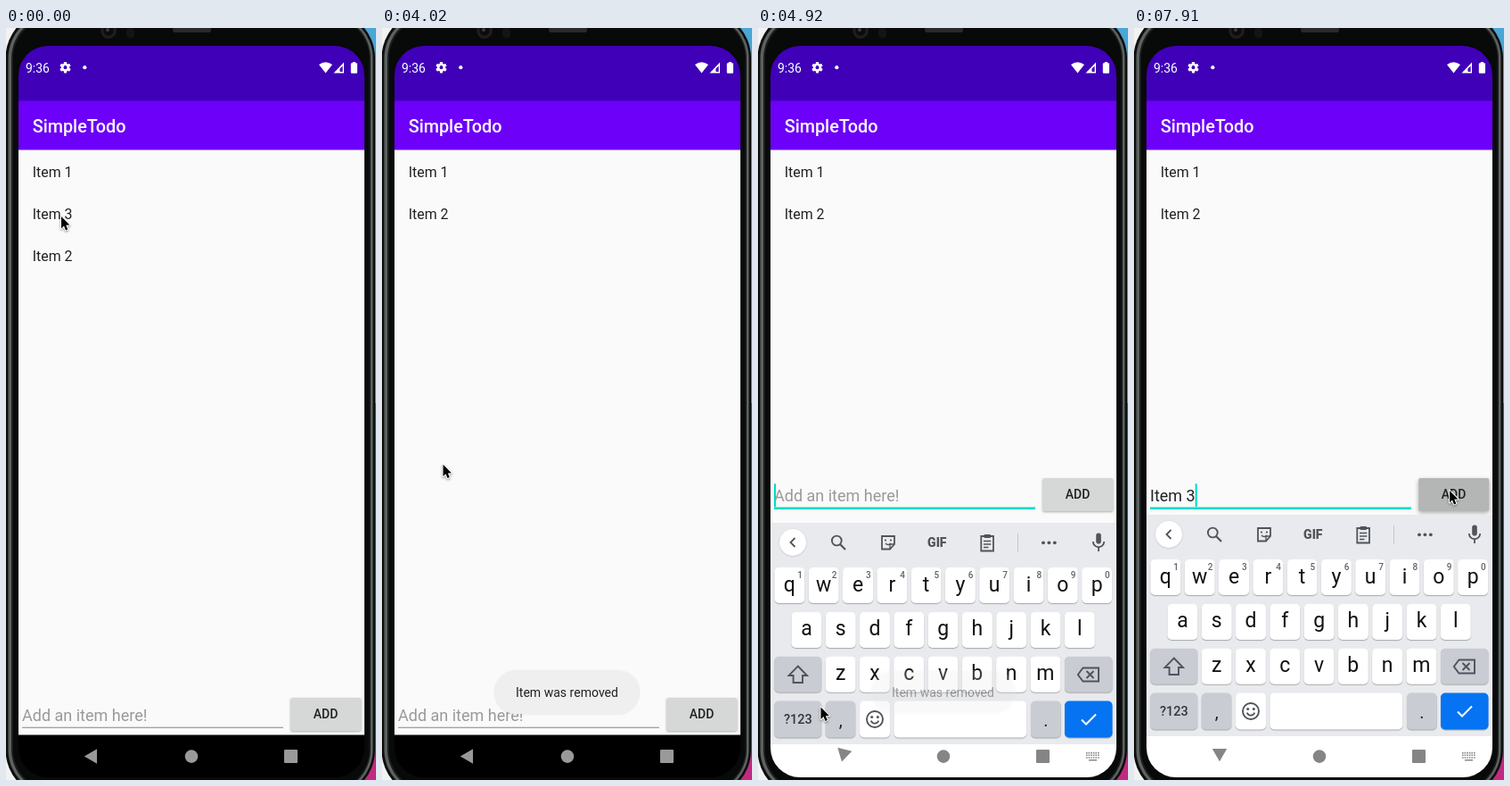
Write an HTML page with a canvas that moves like this. It is 415 px wide and 842 px high and loops after 8000 ms.

```html
<!DOCTYPE html>
<html lang="en">
<head>
<meta charset="utf-8">
<title>Todo list demo</title>
<style>
html, body { margin: 0; width: 100%; height: 100%; overflow: hidden; background: #fff; }
canvas { display: block; width: 415px; height: 842px; }
</style>
</head>
<body>
<canvas id="stage"></canvas>
<script>
const W = 415, H = 842, LOOP = 8000;
const TEAL = '#00dac6', INK = '#202124', ICON = '#50545a';
const canvas = document.getElementById('stage');
const c = canvas.getContext('2d');
const dpr = window.devicePixelRatio || 1;
canvas.width = W * dpr;
canvas.height = H * dpr;

// ---------- helpers ----------
function box(x, y, w, h, color, r = 0) {
  c.fillStyle = color;
  c.beginPath();
  c.roundRect(x, y, w, h, r);
  c.fill();
}
function disc(x, y, r, color) {
  c.fillStyle = color;
  c.beginPath();
  c.arc(x, y, r, 0, Math.PI * 2);
  c.fill();
}
function trace(points, close) {
  c.beginPath();
  points.forEach(([x, y]) => c.lineTo(x, y));
  if (close) c.closePath();
}
function poly(points, color) {
  trace(points, true);
  c.fillStyle = color;
  c.fill();
}
function stroke(color, width) {
  c.strokeStyle = color;
  c.lineWidth = width;
  c.stroke();
}
function line(points, color, width, close) {
  trace(points, close);
  stroke(color, width);
}
function ring(x, y, r, color, width, from = 0, to = Math.PI * 2) {
  c.beginPath();
  c.arc(x, y, r, from, to);
  stroke(color, width);
}
function text(str, x, y, size, color, weight = 400, align = 'left') {
  c.font = `${weight} ${size}px Roboto, sans-serif`;
  c.textAlign = align;
  c.fillStyle = color;
  c.fillText(str, x, y);
}
function shadowed(blur, dy, alpha, draw) {
  c.save();
  c.shadowColor = `rgba(0,0,0,${alpha})`;
  c.shadowBlur = blur * dpr;
  c.shadowOffsetY = dy * dpr;
  draw();
  c.restore();
}
const mix = (a, b, k) => a + (b - a) * k;
const ease = k => k * k * (3 - 2 * k);

// value of the last [time, value] entry already reached
function at(list, t) {
  let value = list[0][1];
  for (const [time, v] of list) if (t >= time) value = v;
  return value;
}

// the screen refreshes about every 150 ms
function tick(t) {
  const lag = t < 3580 ? 0 : t < 4170 ? 10 : t < 5060 ? 20 : 30;
  return Math.max(0, Math.floor((t + lag - 140) / 150) * 150 + 140 - lag);
}

// ---------- timeline ----------
const typed = [[0, ''], [5510, 'I'], [5660, 'It'], [5810, 'Ite'], [6110, 'Item'], [6860, 'Item '], [7010, 'Item 3']];
const composed = [[0, ''], [5660, 'I'], [5810, 'It'], [6110, 'Ite'], [6410, 'Item'], [6860, '']];
const hints = [[0, null], [5660, ['I', "I'm", 'If']], [5810, ['It', "It's", 'If']], [6110, ['Ite', 'Item', 'Its']],
  [6410, ['Item', 'Items', 'Itemized']], [6860, ['is', 'of', 'in']], [7010, null]];
const caretOn = [[0, false], [4470, true], [5060, false], [5510, true], [6560, false], [6860, true], [7460, false], [7910, true]];
const toastAlpha = [[0, 0], [2990, .5], [3140, .85], [3290, 1], [4770, .55], [4920, .2], [5060, 0]];
const slide = [[0, 32], [4920, 9], [5060, 2], [5210, 0]];
const backTurn = [[0, 0], [4770, .36], [4920, .85], [5060, 1]];
const path = [[0, 62, 211], [140, 61.5, 210], [290, 61.5, 209.5], [1790, 61.5, 209.5], [1940, 79, 209.5], [2090, 72, 208],
  [2240, 66.5, 207.5], [3430, 66.5, 207.5], [4320, 70.5, 760.5], [7010, 70.5, 760.5], [7460, 369, 548], [7610, 362, 526], [7760, 355, 519], [7910, 354, 518]];

function pointer(t) {
  const i = path.findLastIndex(p => t >= p[0]);
  const a = path[i], b = path[i + 1];
  if (!b) return [a[1], a[2]];
  const k = ease((t - a[0]) / (b[0] - a[0]));
  return [mix(a[1], b[1], k), mix(a[2], b[2], k)];
}

// ---------- device ----------
function device() {
  box(0, 0, W, H, '#f2f2f2');
  box(300, 0, 115, 420, '#4aa6d6');
  box(300, 420, 115, 422, '#c22a80');
  box(-.5, -20, 414.5, 882, '#0d0e0e', 54);
  box(2.5, -17, 409, 876, '#5c6261', 51);
  box(6, -14, 403, 870, '#1c1e1e', 48);
  box(8, -12, 399.5, 866, '#080909', 46);
  disc(115, 3, 9, '#1d1d1f');
  disc(115, 3, 5.5, '#0b0b0d');
  disc(114, 2, 2, '#3c3c42');
  box(135, 0, 9, 11, '#141416', 4);
  box(187, -4, 43, 9, '#2a2a2c', 3);
}

function gear(x, y) {
  for (let i = 0; i < 6; i++) {
    c.save();
    c.translate(x, y);
    c.rotate(i * Math.PI / 3);
    box(-1.6, -6.2, 3.2, 4, '#fff', .6);
    c.restore();
  }
  ring(x, y, 3.4, '#fff', 2.6);
}

function statusBar() {
  box(14, 20, 388, 62, '#3f00b8');
  box(14, 81.5, 388, 55, '#6c00f8');
  text('9:36', 22, 49.5, 13.9, '#fff');
  gear(66.5, 44.2);
  disc(88.3, 44.2, 2.1, '#fff');
  c.fillStyle = '#fff';
  c.beginPath();
  c.moveTo(358.5, 50.5);
  c.lineTo(351, 41);
  c.quadraticCurveTo(358.5, 35.5, 366, 41);
  c.fill();
  poly([[367.5, 50.5], [379, 50.5], [379, 38.5]], '#fff');
  poly([[374.5, 49], [377.6, 49], [377.6, 42.5], [374.5, 45.5]], '#3f00b8');
  box(386.8, 39.3, 7.2, 11.4, '#fff', 1);
  box(388.8, 38, 3.2, 2, '#fff');
  text('SimpleTodo', 29.7, 117, 19.8, '#fff', 500);
}

function list(t) {
  const items = t < 2840 ? ['Item 1', 'Item 3', 'Item 2'] : ['Item 1', 'Item 2'];
  items.forEach((s, i) => text(s, 29.8, 166.6 + i * 47.4, 15.9, INK));
}

function entryRow(t) {
  const dy = t >= 4770 ? -246 : 0;
  const value = at(typed, t), under = at(composed, t);
  c.save();
  c.translate(0, dy);
  if (t >= 4470) box(18, 782.5, 293, 2.4, TEAL);
  else box(18, 782.8, 293, 1, '#858585');
  if (value) text(value, 18, 776, 18, INK);
  else text('Add an item here!', 18, 776, 18, '#999');
  c.font = '400 18px Roboto, sans-serif';
  if (under) box(18, 777.6, c.measureText(under).width, 1.1, INK);
  if (at(caretOn, t)) box(18 + c.measureText(value).width, 756.3, 2, 26, TEAL);
  const down = t >= 7910;
  shadowed(down ? 5 : 2.5, down ? 2 : 1, .32, () => box(319.2, 750, 79, 37, down ? '#b4b6b6' : '#d6d7d7', 2));
  text('ADD', 358.6, 773.4, 14, INK, 500, 'center');
  c.restore();
}

// ---------- keyboard ----------
function key(x, y, w, color, h = 40) {
  shadowed(1, 1, .28, () => box(x, y, w, h, color, 5));
}

function mic() {
  box(379.2, 556.5, 5.6, 12, ICON, 2.8);
  ring(382, 566, 6.2, ICON, 1.8, 0, Math.PI);
  line([[382, 572], [382, 577]], ICON, 1.8);
}

function strip(words) {
  shadowed(2, .5, .2, () => disc(39, 567, 15, '#fff'));
  const d = words ? 1 : -1;
  line([[39 - 2.5 * d, 562], [39 + 2.5 * d, 567], [39 - 2.5 * d, 572]], ICON, 1.8);
  mic();
  if (words) {
    words.forEach((s, i) => text(s, 101 + i * 106, 574, 17.5, '#5a5e63', 400, 'center'));
    box(150.5, 555, 1, 24, '#c4c7cc');
    box(263, 555, 1, 24, '#c4c7cc');
    return;
  }
  ring(88.3, 565, 5.4, ICON, 1.9);
  line([[92.3, 569.2], [98, 575]], ICON, 2.2);
  line([[139, 560], [153, 560], [153, 569], [148, 574.5], [139, 574.5]], ICON, 1.8, true);
  line([[153, 569], [148, 569], [148, 574.5]], ICON, 1.4);
  disc(143, 564.5, 1.1, ICON);
  disc(149, 564.5, 1.1, ICON);
  ring(146, 566.3, 3.2, ICON, 1.3, .5, Math.PI - .5);
  text('GIF', 200.8, 572, 14, ICON, 800, 'center');
  line([[250.3, 560], [264, 560], [264, 576.5], [250.3, 576.5]], ICON, 1.8, true);
  box(253.5, 558, 7.5, 4, ICON, 1);
  [565.5, 569, 572.5].forEach((y, i) => line([[253, y], [i < 2 ? 261.3 : 258.5, y]], ICON, 1.4));
  box(291, 556.5, 1, 21, '#c4c7cc');
  for (const x of [320, 326.4, 332.8]) disc(x, 567.3, 1.9, ICON);
}

function keyboard(t) {
  const grey = '#c9ccd2', pitch = 38.3;
  c.save();
  c.translate(0, at(slide, t));
  box(14, 792, 388, 80, '#fff');
  box(14, 545, 388, 248, '#e8eaee');
  strip(at(hints, t));
  [['qwertyuiop', 35.4, 595, 622], ['asdfghjkl', 54.4, 645, 671.3], ['zxcvbnm', 92.6, 694.7, 721.3]].forEach(([row, x0, y, base], r) => {
    [...row].forEach((ch, i) => {
      const x = x0 + i * pitch;
      key(x - 17, y, 34, '#fff');
      text(ch, x, base, 23, '#111', 400, 'center');
      if (!r) text(String((i + 1) % 10), x + 11.8, 606.5, 10, '#5f6368', 500, 'center');
    });
  });
  key(18.3, 694.7, 53, grey);
  key(344, 694.7, 53.5, grey);
  line([[44.8, 705.5], [55, 716], [50, 716], [50, 724], [39.6, 724], [39.6, 716], [34.6, 716]], ICON, 1.9, true);
  line([[358.8, 715], [364.5, 707.5], [382, 707.5], [382, 722.5], [364.5, 722.5]], ICON, 1.9, true);
  line([[368.5, 711], [376.5, 719]], ICON, 1.9);
  line([[376.5, 711], [368.5, 719]], ICON, 1.9);
  key(18.3, 744.5, 53, grey, 41);
  key(75.8, 744.5, 33.5, grey, 41);
  key(114, 744.5, 34, '#fff', 41);
  key(152.3, 744.5, 149, '#fff', 41);
  key(306, 744.5, 33.7, grey, 41);
  key(344, 744.5, 53.5, '#0573f2', 41);
  text('?123', 44.8, 770.3, 14.5, '#33363a', 500, 'center');
  text(',', 92.6, 773, 20, '#222', 400, 'center');
  text('.', 322.8, 773, 20, '#222', 400, 'center');
  ring(131, 765, 9, ICON, 1.9);
  disc(127.7, 762.5, 1.5, ICON);
  disc(134.3, 762.5, 1.5, ICON);
  ring(131, 765, 4.6, ICON, 1.8, .35, Math.PI - .35);
  line([[363, 765.5], [368, 770.5], [379, 759.5]], '#fff', 2);
  c.restore();
}

function navBar(t) {
  const color = t >= 4770 ? '#858585' : '#999';
  const turn = at(backTurn, t);
  const x = mix(97.3, 96, turn), y = mix(815.5, 811.8, turn);
  poly([0, 1, 2].map(i => {
    const a = Math.PI - turn * Math.PI / 2 + i * Math.PI * 2 / 3;
    return [x + 9.5 * Math.cos(a), y + 9.5 * Math.sin(a)];
  }), color);
  disc(208, 815.6, 7.3, color);
  box(312, 808, 15, 15, color, 1);
  if (t < 4620) return;
  for (let r = 0; r < 3; r++)
    for (let i = 0; i < 6; i++) box(368 + i * 2.6, 810.8 + r * 2.7, 1.6, 1.6, color);
  box(371, 818.9, 9, 1.6, color);
}

function toast(t) {
  const alpha = at(toastAlpha, t);
  if (!alpha) return;
  c.save();
  c.globalAlpha = alpha;
  shadowed(2, .5, .08, () => box(126, 719, 163, 49, '#efefef', 24.5));
  c.globalAlpha = Math.min(1, alpha * 2);
  text('Item was removed', 207.5, 749.2, 14.05, INK, 400, 'center');
  c.restore();
}

function cursor(x, y) {
  c.save();
  c.translate(x, y);
  const arrow = [[0, 0], [0, 13.4], [3, 10.6], [5, 15.4], [7.3, 14.4], [5.3, 9.8], [9.4, 9.5]];
  c.lineJoin = 'round';
  shadowed(2.5, 1.2, .4, () => line(arrow, '#fff', 2, true));
  poly(arrow, '#000');
  c.restore();
}

function draw(now) {
  const t = tick(now);
  c.setTransform(dpr, 0, 0, dpr, 0, 0);
  device();
  c.save();
  c.beginPath();
  c.roundRect(14, 20, 388, 819, 33);
  c.clip();
  box(14, 20, 388, 819, '#000');
  box(14, 136, 388, 655.5, '#fafafa');
  statusBar();
  list(t);
  entryRow(t);
  if (t >= 4770) keyboard(t);
  navBar(t);
  toast(t);
  c.restore();
  cursor(...pointer(t));
}

const start = performance.now();
function loop() {
  draw((performance.now() - start) % LOOP);
  requestAnimationFrame(loop);
}
loop();
</script>
</body>
</html>
```
